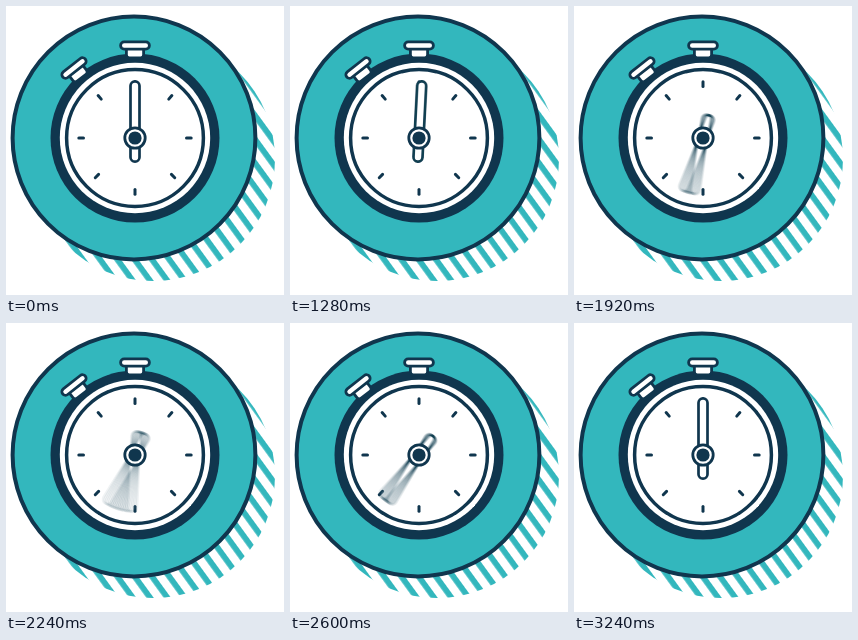
These frames come from a looping animation (278 by 289 pixels, 3.96 s). An HTML page:

```html
<!DOCTYPE html>
<html lang="en">
<head>
<meta charset="utf-8">
<title>Stopwatch</title>
<style>
  html, body { margin: 0; width: 100%; height: 100%; overflow: hidden; background: #fff; }
  svg { display: block; }
  #hands { isolation: isolate; }
  #hands use { mix-blend-mode: plus-lighter; }
</style>
</head>
<body>
<svg width="278" height="289" viewBox="0 0 278 289" fill="#fff" stroke="#10364e">
  <defs>
    <pattern id="hatch" width="14" height="14" patternUnits="userSpaceOnUse" patternTransform="rotate(54)">
      <rect width="14" height="5.8" fill="#33b7bd" stroke="none"/>
    </pattern>
    <g id="button" stroke-width="2.8">
      <path d="M-8.6 3V9.3Q-8.6 12.3 -5.6 12.3H5.6Q8.6 12.3 8.6 9.3V3Z"/>
      <rect x="-14.4" y="-3.6" width="28.8" height="7.2" rx="3.6"/>
    </g>
    <rect id="hand" x="-4.5" y="-56.7" width="9" height="80.4" rx="4.5" stroke-width="2.7"/>
  </defs>
  <circle cx="147" cy="153" r="122" fill="url(#hatch)" stroke="none"/>
  <circle cx="128" cy="132" r="121.4" fill="#33b7bd" stroke-width="4"/>
  <g transform="translate(129 132)">
    <circle r="84.5" fill="#10364e" stroke="none"/>
    <use href="#button" transform="translate(-61 -70) rotate(-38)"/>
    <use href="#button" id="crown" transform="translate(0 -92.5)"/>
    <circle r="75.2" stroke="none"/>
    <circle r="68.4" stroke-width="3.5"/>
    <g id="ticks" stroke-width="3" stroke-linecap="round"></g>
    <g id="hands"></g>
    <circle r="10.2" stroke-width="2.8"/>
    <circle r="6.6" fill="#10364e" stroke="none"/>
  </g>
</svg>
<script>
const LOOP = 3960, FRAME = 40, SHUTTER = 0.5, SAMPLES = 16;
const PRESS = { start: 720, length: 440, depth: 4.5 };
const SPIN = { start: 1160, length: 2080, degrees: 1080 };
const $ = id => document.getElementById(id);
const clamp = v => Math.min(1, Math.max(0, v));

$('ticks').innerHTML = [0, 41, 90, 135, 180, 225, 270, 319]
  .map(a => `<path d="M0-51.5V-56.2" transform="rotate(${a})"/>`).join('');
$('hands').innerHTML = '<use href="#hand"/>'.repeat(SAMPLES);
const copies = [...$('hands').children];

// cubic-bezier(.66, 0, .376, 1), solved by bisection
function ease(x) {
  let lo = 0, hi = 1;
  for (let i = 0; i < 24; i++) {
    const s = (lo + hi) / 2, r = 1 - s;
    if (3 * s * r * (0.66 * r + 0.376 * s) + s * s * s < x) lo = s; else hi = s;
  }
  return lo * lo * (3 - 2 * lo);
}

const angleAt = t => SPIN.degrees * ease(clamp((t - SPIN.start) / SPIN.length));

function draw(t) {
  const u = clamp((t - PRESS.start) / PRESS.length);
  const drop = PRESS.depth * Math.sin(Math.PI * u) ** 2;
  $('crown').setAttribute('transform', `translate(0 ${drop - 92.5})`);

  // Motion blur: average of several poses while the shutter is open
  const half = SHUTTER * FRAME / 2;
  const from = angleAt(t - half), sweep = angleAt(t + half) - from;
  const blurred = sweep > 0.8;
  copies.forEach((copy, i) => {
    const angle = blurred ? from + sweep * i / (SAMPLES - 1) : angleAt(t);
    copy.setAttribute('transform', `rotate(${angle})`);
    copy.setAttribute('opacity', blurred ? 1 / SAMPLES : i ? 0 : 1);
  });
}

const began = performance.now();
function tick() {
  const t = (performance.now() - began) % LOOP;
  draw(Math.floor(t / FRAME) * FRAME);
  requestAnimationFrame(tick);
}
tick();
</script>
</body>
</html>
```
